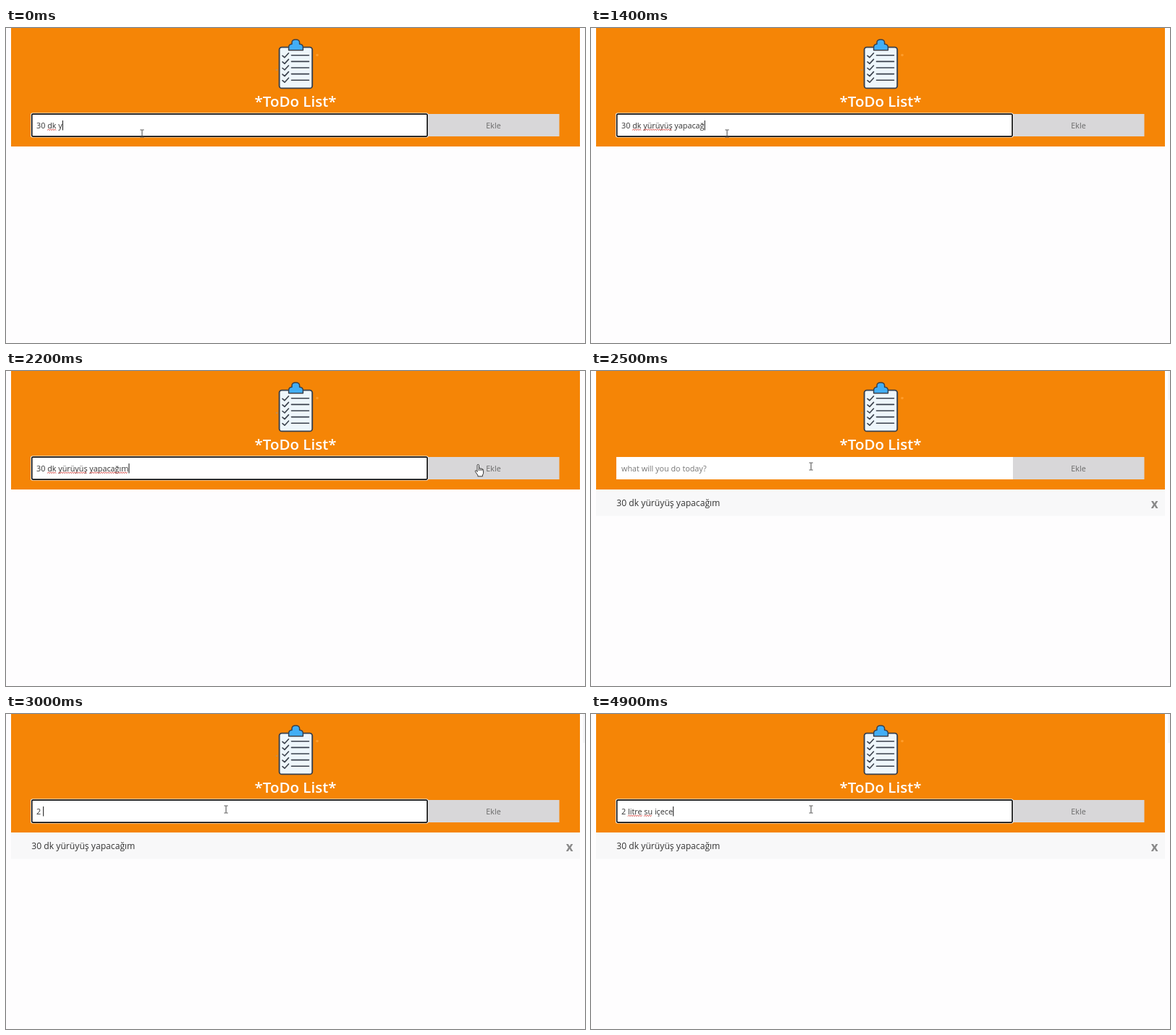
An HTML page for the animation above (5000 ms loop, 800 by 436 pixels).

```html
<!DOCTYPE html>
<html lang="tr">
<head>
<meta charset="utf-8">
<title>ToDo List</title>
<style>
  html, body { margin: 0; width: 100%; height: 100%; overflow: hidden; background: #fefdfe; }
  svg { display: block; width: 800px; height: 436px; }
  text { font-family: "Open Sans", "Noto Sans", sans-serif; white-space: pre; }
  .field { font-size: 10.8px; }
</style>
</head>
<body>
<svg viewBox="0 0 800 436" xmlns="http://www.w3.org/2000/svg">
  <rect width="800" height="436" fill="#fefdfe"/>
  <rect x="7" width="786" height="164" fill="#f58506"/>

  <g stroke="#3a414c" stroke-linejoin="round" stroke-linecap="round">
    <rect x="377.6" y="26.6" width="45.6" height="56.8" rx="3.5" fill="#eef6fb" stroke-width="1.9"/>
    <path d="M390.6 30.8V27Q390.6 22.6 395 22.3V20Q395.2 16 400.3 16T405.6 20V22.3Q410.4 22.6 410.4 27V30.8Z" fill="#42aef5" stroke-width="1.5"/>
    <path id="checks" fill="none" stroke-width="1.6"/>
  </g>
  <circle cx="430" cy="37.5" r="1.8" fill="#ff9d2c"/>
  <circle cx="374" cy="58" r="1.3" fill="#c98f4c"/>

  <text x="400" y="108.5" text-anchor="middle" font-size="20.5" font-weight="600" fill="#fff">*ToDo List*</text>

  <rect x="583" y="119" width="181.5" height="31" fill="#d8d7d9"/>
  <text class="field" x="673.5" y="138.7" text-anchor="middle" fill="#686868">Ekle</text>
  <rect x="35" y="119" width="548" height="31" fill="#fff"/>
  <g id="focus">
    <rect x="34" y="117.6" width="549.6" height="34" rx="2.5" fill="#fff"/>
    <rect x="35.7" y="119.1" width="546.4" height="31" rx="1.5" fill="#fff" stroke="#111" stroke-width="1.7"/>
  </g>
  <text id="hint" class="field" x="42" y="138.7" fill="#777">what will you do today?</text>
  <text id="typed" class="field" x="42" y="138.7" fill="#333"></text>
  <path id="squiggle" fill="none" stroke="#d9534f" stroke-width="0.9"/>
  <rect id="caret" y="128" width="1" height="13.5" fill="#111"/>

  <g id="item">
    <rect x="7" y="164" width="786" height="36.5" fill="#f8f8f9"/>
    <text x="35.3" y="187" font-size="12.15" fill="#333">30 dk yürüyüş yapacağım</text>
    <text x="778.7" y="190" text-anchor="middle" font-size="17" font-weight="700" fill="#888">x</text>
    <rect x="797" y="0" width="3" height="40" fill="#f5f5f7"/>
  </g>

  <path id="beam" d="M-2.5 -5H-.7L0 -4.4L.7 -5H2.5M0 -4.4V4.4M-2.5 5H-.7L0 4.4L.7 5H2.5" fill="none" stroke="#444"/>
  <path id="hand" d="M-2.9 2.5V-6.3Q-2.9 -7.6 -1.7 -7.6T-.5 -6.3V-2.2Q.6 -3.2 1.7 -1.8Q2.9 -2.6 3.8 -1.2Q5.6 -1.6 5.6 .6V4.2Q5.4 6 4.4 7V8.8H-2.1V7.2L-5.4 2.6Q-6.3 .9 -4.7 .7Q-3.8 .8 -2.9 2.5ZM-.5 -2.2V1M1.7 -1.8V1M3.8 -1.2V1.2" fill="#fff" stroke="#222" stroke-width="0.9" stroke-linejoin="round"/>
</svg>
<script>
const LOOP = 5000, STEP = 100, LEFT = 42;
const FIRST = "30 dk yürüyüş yapacağım";
const SECOND = "2 litre su içecek";
const ADDED = 2300, FOCUSED = 2700;
const $ = id => document.getElementById(id);
const show = (id, on) => $(id).setAttribute("visibility", on ? "visible" : "hidden");

// moment at which each letter of the second entry lands
const keys = [2900, 3000, 3200, 3400, 3600, 3800, 4000, 4200, 4300, 4400,
  4500, 4600, 4700, 4800, 4900, 4900];

// underlined words: text, first letter, end, start time
const marks = [
  [FIRST, 3, 5, 0], [FIRST, 6, 13, 1300], [FIRST, 14, 23, 1900],
  [SECOND, 2, 7, 4300], [SECOND, 8, 10, 4600]
];

// pointer stops: time, x, y
const stops = [[0, 188, 146], [1800, 188, 146], [2100, 654, 137],
  [2300, 654, 137], [2500, 304, 132], [LOOP, 304, 132]];

const pen = document.createElement("canvas").getContext("2d");
pen.font = '10.8px "Open Sans", "Noto Sans", sans-serif';
const edge = (text, n) => LEFT + pen.measureText(text.slice(0, n)).width;

function wave(from, to) {
  let d = `M${from} 141.8`;
  for (let x = from + 1.5, up = true; x <= to; x += 1.5, up = !up) d += `L${x} ${up ? 139.8 : 141.8}`;
  return d;
}

function pointer(t) {
  const i = stops.findIndex(s => s[0] > t);
  const [t0, x0, y0] = stops[i - 1], [t1, x1, y1] = stops[i];
  const k = (t - t0) / (t1 - t0);
  return [x0 + (x1 - x0) * k, y0 + (y1 - y0) * k];
}

function draw(time) {
  const t = Math.floor(time % LOOP / STEP) * STEP;
  const added = t >= ADDED;
  const focused = !added || t >= FOCUSED;
  const source = added ? SECOND : FIRST;
  const count = added ? keys.filter(k => k <= t).length : Math.min(FIRST.length, 7 + t / STEP);

  $("typed").textContent = source.slice(0, count);
  $("caret").setAttribute("x", edge(source, count) + 0.2);
  $("squiggle").setAttribute("d", marks
    .filter(([text, , , start]) => text === source && t >= start)
    .map(([text, a, b]) => wave(edge(text, a), edge(text, b))).join(""));
  show("hint", !count);
  show("focus", focused);
  show("caret", focused);
  show("item", added);

  const [x, y] = pointer(t);
  const overButton = x > 583;
  show("beam", !overButton);
  show("hand", overButton);
  for (const id of ["beam", "hand"]) $(id).setAttribute("transform", `translate(${x} ${y})`);
}

$("checks").setAttribute("d", [0, 1, 2, 3, 4].map(i => {
  const y = 37.8 + i * 8.6;
  return `M382 ${y + 0.5}L385 ${y + 3}L390.5 ${y - 3}M394.5 ${y}H418.5`;
}).join(""));

function tick() {
  draw(performance.now());
  requestAnimationFrame(tick);
}
tick();
</script>
</body>
</html>
```
